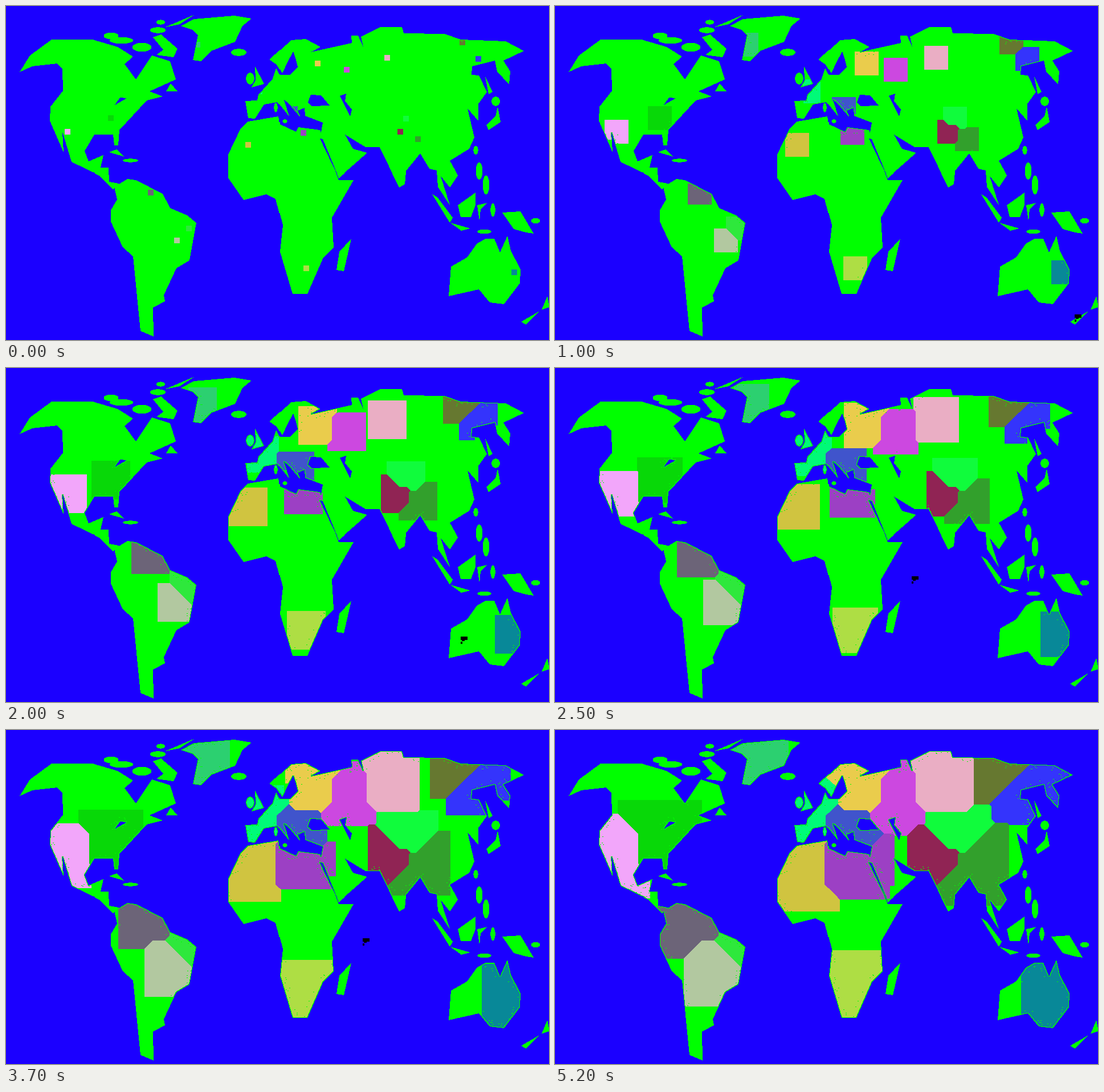
A matplotlib script that plays this animation: 953 by 587 pixels, repeating every 5.3 s.

```python
import numpy as np
import matplotlib.pyplot as plt
from matplotlib.animation import FuncAnimation
from matplotlib.path import Path

W, H, DPI = 953, 587, 100
FRAMES, STEP_MS = 53, 100
START = 5
BLUE, GREEN = (27, 0, 255), (0, 255, 0)

yy, xx = np.mgrid[:H, :W]
centres = np.column_stack([xx.ravel(), yy.ravel()]) + 0.5
ground = np.zeros((H, W), bool)


def inside(pts):
    return Path(pts).contains_points(centres).reshape(H, W)


def land(*pts):
    ground[inside(pts)] = True


def sea(*pts):
    ground[inside(pts)] = False


def isle(x, y, w, h):
    ground[((xx - x) / w) ** 2 + ((yy - y) / h) ** 2 < 0.27] = True


# North America
land((24, 117), (42, 88), (80, 60), (152, 60), (196, 73), (223, 90),
     (208, 103), (228, 130), (256, 88), (288, 98), (298, 130), (252, 151),
     (275, 160), (247, 167), (199, 219), (197, 246), (190, 246), (188, 227),
     (155, 227), (138, 256), (145, 274), (171, 263), (166, 285), (180, 285),
     (181, 309), (198, 312), (188, 323), (165, 299), (115, 275), (99, 222),
     (101, 258), (77, 203), (78, 178), (100, 150), (99, 112), (90, 102),
     (46, 107))
sea((191, 175), (200, 162), (212, 163))

# Greenland, Arctic islands, Newfoundland, Cuba
land((307, 36), (330, 24), (401, 18), (431, 23), (415, 36), (402, 64),
     (360, 80), (342, 98), (328, 96), (337, 52), (327, 43))
land((280, 38), (331, 16), (305, 33))
land((258, 56), (272, 51), (301, 76), (294, 91), (264, 87), (276, 78))
land((281, 151), (289, 137), (301, 151))
land((181, 258), (194, 253), (208, 266))

# South America
land((190, 318), (213, 304), (228, 306), (275, 330), (288, 355), (318, 368),
     (334, 381), (322, 447), (299, 461), (277, 508), (279, 519), (258, 530),
     (259, 581), (236, 571), (223, 440), (205, 424), (184, 379), (184, 359),
     (195, 340))

# Africa and Madagascar
land((425, 204), (478, 195), (480, 209), (508, 222), (512, 214), (550, 219),
     (583, 306), (609, 306), (571, 372), (574, 424), (556, 442), (528, 506),
     (502, 506), (480, 432), (485, 385), (473, 339), (457, 331), (417, 341),
     (390, 302), (390, 262), (412, 216))
land((605, 409), (592, 466), (579, 464), (584, 432))

# Europe and the Middle East
land((420, 168), (441, 167), (443, 157), (468, 129), (474, 110), (480, 122),
     (498, 122), (511, 108), (507, 92), (503, 81), (494, 98), (484, 119),
     (475, 104), (462, 95), (500, 61), (525, 59), (551, 73), (534, 82),
     (606, 66), (655, 249), (630, 249), (594, 227), (608, 252), (633, 259),
     (583, 303), (550, 234), (555, 206), (524, 194), (523, 180), (511, 185),
     (516, 197), (495, 172), (487, 166), (496, 195), (476, 170), (453, 174),
     (437, 199), (425, 198))
land((437, 107), (453, 138), (431, 144), (438, 131))

# Northern and eastern Asia
land((606, 66), (605, 53), (617, 53), (626, 73), (622, 55), (656, 38),
     (694, 38), (697, 49), (769, 50), (797, 60), (876, 63), (908, 80),
     (872, 97), (884, 116), (882, 139), (861, 116), (857, 97), (817, 107),
     (816, 122), (829, 123), (843, 152), (828, 173), (828, 203), (809, 181),
     (821, 232), (812, 252), (778, 273), (792, 298), (778, 319), (762, 299),
     (778, 350), (757, 318), (755, 290), (742, 287), (726, 260), (701, 291),
     (699, 313), (689, 319), (654, 248), (600, 180))

# Black Sea, Caspian, Red Sea
sea((529, 170), (534, 157), (552, 158), (567, 176), (535, 177))
sea((585, 159), (596, 155), (594, 168), (606, 183), (603, 195))
sea((550, 234), (555, 235), (583, 303))

# East Asian islands, Indonesia, New Guinea
land((840, 125), (853, 152), (846, 156))
land((842, 210), (858, 195), (862, 178), (867, 205), (846, 219))
land((747, 331), (756, 336), (783, 372), (778, 381))
land((792, 350), (823, 328), (823, 350), (815, 371), (797, 371))
land((779, 381), (814, 391), (798, 395))
land((826, 350), (844, 346), (832, 357), (830, 378))
land((870, 363), (902, 361), (925, 400), (912, 398), (890, 392))

# Australia and New Zealand
land((780, 458), (808, 442), (826, 417), (841, 409), (856, 409), (866, 433),
     (879, 404), (885, 430), (902, 463), (901, 487), (873, 524), (848, 521),
     (829, 498), (776, 510))
land((903, 555), (934, 537), (912, 560))
land((939, 534), (949, 510), (953, 529))

for spot in [(408, 82, 26, 12), (184, 53, 25, 11), (202, 61, 40, 11),
             (238, 73, 32, 15), (266, 43, 26, 10), (271, 29, 14, 8),
             (218, 272, 26, 6), (428, 128, 14, 20), (473, 179, 6, 16),
             (488, 203, 8, 6), (858, 168, 14, 16), (823, 254, 8, 14),
             (829, 290, 11, 28), (841, 314, 11, 32), (928, 377, 15, 9),
             (853, 358, 8, 22), (838, 396, 24, 7)]:
    isle(*spot)

SEEDS = [
    (336, 69, "#2cd070"), (546, 102, "#eacc4c"), (597, 113, "#cc48e0"),
    (668, 92, "#eaaec4"), (800, 65, "#667830"), (828, 94, "#3434fc"),
    (445, 151, "#00fa78"), (506, 182, "#4054cc"), (184, 198, "#08d808"),
    (108, 222, "#f2a6fa"), (425, 245, "#d0c440"), (521, 224, "#9c40c4"),
    (701, 199, "#10fc3c"), (691, 222, "#902454"), (722, 235, "#32a02c"),
    (254, 328, "#6c6478"), (321, 391, "#2ee83c"), (300, 412, "#b2c8a0"),
    (526, 461, "#aede44"), (891, 468, "#088898"),
]
# Narrow straits the colours can cross
STRAITS = [(446, 151, 445, 140), (440, 131, 429, 129), (474, 112, 476, 102),
           (508, 184, 528, 186)]


def around(a):
    """Largest value in each 3x3 neighbourhood."""
    p = np.pad(a, 1)
    rows = np.maximum(np.maximum(p[:-2], p[1:-1]), p[2:])
    return np.maximum(np.maximum(rows[:, :-2], rows[:, 1:-1]), rows[:, 2:])


def spread(last):
    """Owner of each pixel and the radius at which it is reached."""
    passable = ground.copy()
    for x0, y0, x1, y1 in STRAITS:
        for s in np.linspace(0, 1, 40):
            x, y = round(x0 + s * (x1 - x0)), round(y0 + s * (y1 - y0))
            passable[y - 1:y + 2, x - 1:x + 2] = True
    owner = np.zeros((H, W), np.uint8)
    reach = np.full((H, W), W)
    for i, (x, y, _) in enumerate(SEEDS):
        box = np.s_[y - START:y + START, x - START:x + START]
        owner[box], reach[box] = i + 1, START
    for r in range(START + 1, last + 1):
        fresh = (owner == 0) & passable
        owner = np.where(fresh, around(owner), owner)
        reach[fresh & (owner > 0)] = r
    return owner, reach


def paintable():
    """Land without a thin rim and a few specks along the coast."""
    rim = coast = around(~ground)
    for _ in range(7):
        coast = around(coast)
    specks = coast & (np.random.default_rng(4).random((H, W)) < 0.012)
    specks[:, 1:] |= specks[:, :-1]
    return ground & ~rim & ~specks


owner, reach = spread(74)
paint = paintable()
palette = np.array([GREEN] + [tuple(bytes.fromhex(c[1:])) for *_, c in SEEDS],
                   np.uint8)
base = np.where(ground[..., None], GREEN, BLUE).astype(np.uint8)
tinted = palette[owner]

# The small margin keeps the canvas from being rounded down
fig = plt.figure(figsize=((W + 0.01) / DPI, (H + 0.01) / DPI), dpi=DPI)
ax = fig.add_axes([0, 0, 1, 1])
ax.axis("off")
view = ax.imshow(base, interpolation="nearest", aspect="auto")


def radius(i):
    return round(np.interp(i, [0, 10, 16, 25, 37, 45, 52],
                           [5, 21, 30, 40, 57, 65, 74]))


def draw_mark(img, i):
    if not 3 <= i <= 46:
        return
    times = [3, 6, 18, 23, 38, 44]
    x = round(np.interp(i, times, [W, 911, 911, 625, 625, 494]))
    y = round(np.interp(i, times, [H, 542, 542, 366, 366, 579]))
    img[y:y + 6, x:x + 12] = 0
    if y < 570:
        img[y + 6:y + 8, x + 2:x + 7] = 0
        img[y + 9:y + 13, x:x + 3] = 0


def draw(i):
    on = paint & (reach <= radius(i))
    img = np.where(on[..., None], tinted, base)
    draw_mark(img, i)
    view.set_data(img)
    return [view]


anim = FuncAnimation(fig, draw, frames=FRAMES, interval=STEP_MS, repeat=True)
plt.show()
```
